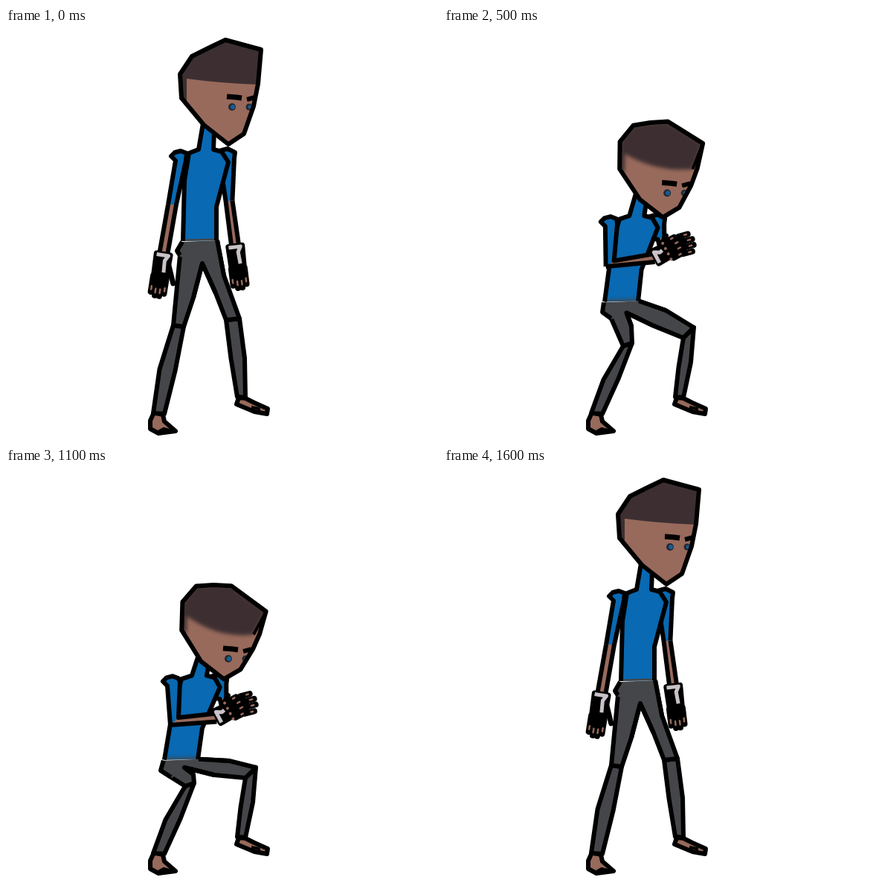
Recreate the animation shown at these times as an HTML page with a canvas. Size 581 by 553 pixels, loop 1700 ms.

```html
<!DOCTYPE html>
<html lang="en">
<head>
<meta charset="utf-8">
<title>Crouch and rise</title>
<style>
html, body { margin: 0; width: 100%; height: 100%; overflow: hidden; background: #fff; }
canvas { display: block; }
</style>
</head>
<body>
<canvas id="stage" width="581" height="553"></canvas>
<script>
const ctx = document.getElementById('stage').getContext('2d');
const INK = '#000', SKIN = '#986a5c', HAIR = '#3d2f31', SHIRT = '#0969b2', PANTS = '#454649', CUFF = '#c9c2c8';
const LOOP = 1700, STEP = 100;

// Depth of the crouch over time: 0 upright, 1 lowest
const keys = [[0, 0], [300, 0.275], [500, 0.77], [700, 0.935], [1100, 1], [1400, 0.37], [1600, 0]];

const clamp = u => Math.max(0, Math.min(1, u));
const smooth = u => (u = clamp(u)) * u * (3 - 2 * u);
const mix = (a, b, u) => a.map((v, i) => v + (b[i] - v) * u);
const add = (a, b, k = 1) => a.map((v, i) => v + b[i] * k);

// Monotone cubic through the keys
function crouchAt(t) {
  let i = 0;
  while (i < keys.length - 2 && t >= keys[i + 1][0]) i++;
  const rate = k => keys[k] && keys[k + 1] ? (keys[k + 1][1] - keys[k][1]) / (keys[k + 1][0] - keys[k][0]) : 0;
  const slope = (a, b) => a * b > 0 ? 2 * a * b / (a + b) : 0;
  const [t0, p] = keys[i], [t1, q] = keys[i + 1];
  const span = t1 - t0, u = clamp((t - t0) / span), r = rate(i);
  return p + (q - p) * smooth(u) + span * u * (1 - u) * (slope(rate(i - 1), r) * (1 - u) - slope(r, rate(i + 1)) * u);
}

let c, reach, clasp;   // crouch depth and the two stages of the arms

function setPose(t) {
  c = crouchAt(t);
  reach = smooth(c / 0.28);
  clasp = smooth((c - 0.38) / 0.36);
}
const sway = () => -15 * c * (1 - c);

// Upper body: sinks and leans forward
const sink = ([x, y]) => [
  x + sway() - c * (10 + 0.13 * (y - 170)),
  y + c * (115 - 0.08 * (y - 170))
];
// Head: tips forward; points on the front of the face travel further
const nod = ([x, y], front = 0) => {
  const dx = x - 290, dy = y - 85;
  return [
    x + c * (8 - 0.1 * (y - 16) - 4 * front),
    y + c * (134 + 0.22 * dx - 0.08 * dy - 0.0045 * dx * dy + 16 * front)
  ];
};
// Arm joints ride with the body and move in two stages
const swing = (p, out, shut) => add(add(add(p, out, reach), shut, clasp), [0, 115], c);
const leg = (up, down) => mix(up, down, c);
const knee = (up, down) => mix(up, down, 1 - (1 - c) ** 4);

function trace(pts, close) {
  ctx.beginPath();
  pts.forEach(p => ctx.lineTo(...p));
  if (close) ctx.closePath();
}
function fill(pts, color) {
  trace(pts, true);
  ctx.fillStyle = color;
  ctx.fill();
}
function line(pts, width = 6, color = INK, close = false) {
  trace(pts, close);
  ctx.lineWidth = width;
  ctx.strokeStyle = color;
  ctx.stroke();
}
function shape(pts, color) {
  fill(pts, color);
  line(pts, 6, INK, true);
}
function dot([x, y], r, color) {
  ctx.beginPath();
  ctx.arc(x, y, r, 0, Math.PI * 2);
  ctx.fillStyle = color;
  ctx.fill();
}
function soften() {
  if (c > 0.02) ctx.filter = `blur(${Math.min(2.5, c * 9)}px)`;
}

function drawFeet() {
  shape([[199, 516], [211, 519], [213, 528], [228, 541], [205, 544], [194, 538], [194, 527]], SKIN);
  line([[203, 543], [212, 538], [228, 542]], 4);
  shape([[313, 496], [322, 497], [334, 503], [352, 511], [351, 518], [334, 515], [310, 505]], SKIN);
  line([[330, 509], [340, 511], [340, 516], [351, 517]], 4);
}

function drawShin(out, inn, ankleOut, ankleIn, bulge) {
  const calf = add(mix(out, ankleOut, 0.5), [bulge, 0]);
  const front = add(mix(inn, ankleIn, 0.5), [-bulge / 3, 0]);
  shape([out, calf, ankleOut, ankleIn, front, inn], PANTS);
}

function drawLegs() {
  const crotch = leg([264, 316], [240, 402]);
  const hipL = sink([237, 287]), hipR = sink([284, 285]);
  const corner = leg([230, 299], [208, 406]), fold = leg([234, 305], [222, 415]);

  const farKnee = knee([305, 391], [329, 409]), farHalf = knee([9, -1], [7, -7]);
  const farOut = add(farKnee, farHalf), farIn = add(farKnee, farHalf, -1);
  drawShin(farOut, farIn, [322, 496], [311, 495], 3);
  const farThigh = [hipR, leg([293, 332], [300, 393]), farOut, farIn, leg([282, 356], [280, 412]), crotch];
  fill(farThigh, PANTS);
  line(farThigh);

  const nearKnee = knee([232, 400], [247, 425]), nearHalf = knee([-7, -1], [-6, 2]);
  const nearOut = add(nearKnee, nearHalf), nearIn = add(nearKnee, nearHalf, -1);
  drawShin(nearOut, nearIn, [198, 517], [213, 518], -5);
  const nearThigh = [corner, fold, nearOut, nearIn, leg([252, 362], [252, 411]), crotch];
  fill(nearThigh, PANTS);
  line(nearThigh);

  const pelvis = [hipL, corner, fold, crotch, farThigh[1], hipR];
  fill(pelvis, PANTS);
  line([fold, crotch, hipR], 3, PANTS);
  line([hipL, corner, fold]);
  line([hipR, farThigh[1]]);
  line([nearThigh[4], crotch, farThigh[4]]);
}

function drawTorso() {
  const left = [[265, 128], [259, 163], [246, 168], [240, 205], [238, 286]].map(sink);
  const right = [[283, 285], [283, 240], [299, 180], [290, 166], [279, 163], [280, 138]].map(sink);
  const body = [...left, ...right];
  fill(body, SHIRT);
  ctx.save();
  trace(body, true);
  ctx.clip();
  soften();
  line([left[4], right[0]], 5, PANTS);
  ctx.restore();
  line(left);
  line(right);
}

function drawHead() {
  const skull = [[295, 16], [343, 29], [339, 75], [333, 105], [320, 142], [299, 156],
    [266, 130], [236, 94], [234, 62], [250, 38], [272, 27]].map(p => nod(p));
  fill(skull, SKIN);
  ctx.save();
  trace(skull, true);
  ctx.clip();

  const [x, y] = nod([304, 106], 1);
  for (const [dx, r] of [[0, 5], [23, 4.5]]) {
    dot([x + dx, y], r, '#252831');
    dot([x + dx + 1, y], r - 2, '#155f96');
  }
  line([[x - 7, y - 14], [x + 6, y - 13], [x + 13, y - 12]], 7);
  line([[x + 20, y - 10], [x + 31, y - 13]], 6);

  // Hair with a curved lower edge and a sideburn
  const edgeR = add(nod([339, 76]), [-8, 0], c), edgeL = nod([243, 68], 0.6), bend = nod([288, 74], 1.3);
  trace([...skull.slice(7), skull[0], skull[1], edgeR]);
  ctx.quadraticCurveTo(...bend, ...edgeL);
  ctx.lineTo(...nod([243, 98]));
  ctx.fillStyle = HAIR;
  soften();
  ctx.fill();
  ctx.restore();
  line([skull[1], edgeR], 4);
  line(skull, 6, INK, true);
}

// Sleeve above the elbow, bare skin below, no seam line between
function drawArm(shoulder, elbow, wrist, cap) {
  const top = cap.map(p => add(shoulder[0], p));
  fill([...elbow, wrist[1], wrist[0]], SKIN);
  fill([elbow[0], shoulder[0], ...top, shoulder[1], elbow[1]], SHIRT);
  line([elbow[0], shoulder[0], ...top, shoulder[1], elbow[1], wrist[1]]);
  line([elbow[0], wrist[0]]);
}

// Pair of points on both sides of the end of a bone
function sides(from, to, at, half) {
  const dx = to[0] - from[0], dy = to[1] - from[1], k = half / Math.hypot(dx, dy);
  return [add(at, [-dy, dx], k), add(at, [dy, -dx], k)];
}

function drawHand([x, y], degrees, thumb) {
  const len = 64 - 4 * reach - 14 * clasp;
  ctx.save();
  ctx.translate(x, y);
  ctx.rotate(degrees * Math.PI / 180);
  ctx.lineCap = 'round';
  line([[2, -9], [len * 0.55, -8], [len * 0.55, 8], [2, 9]], 8, INK, true);
  fill([[0, -10], [len * 0.6, -10], [len * 0.6, 10], [0, 10]], INK);
  line([[12, thumb * 8], [len * 0.6, thumb * 19]], 7);
  const tips = [0, 1, 2, 3].map(i => [len - 4 - 4 * Math.abs(i - 1.5), (i - 1.5) * (6 + 2 * clasp)]);
  for (const tip of tips) {
    const root = [len * 0.5, tip[1]];
    line([root, tip], 8);
    line([mix(root, tip, 0.65), mix(root, tip, 0.85)], 2.5, SKIN);
    if (clasp > 0.5) dot(add(root, [-4, 0]), 2, SKIN);
  }
  ctx.lineCap = 'butt';
  line([[3, 9], [3, -7], [10, -3], [26 - 12 * reach, -4]], 5, CUFF);
  ctx.restore();
}

function draw(t) {
  setPose(t);
  ctx.fillStyle = '#fff';
  ctx.fillRect(0, 0, 581, 553);

  const farElbow = swing([300, 232], [4, -2], [-12, -36]);
  const farWrist = swing([308, 291], [19, -14], [-31, -68]);
  drawArm([sink([307, 175]), sink([290, 195])],
    sides(farWrist, farElbow, farElbow, 4.5), sides(farWrist, farElbow, farWrist, 5),
    [[1, -8], [-9, -13], [-20, -10]]);
  drawFeet();
  drawLegs();
  drawTorso();
  drawHead();
  drawHand(farWrist, 83 - 21 * reach - 77 * clasp, 0);

  const wrist = swing([212, 302], [29, -15], [42, -67]);
  const elbow = [leg([218, 237], [221, 345]), leg([229, 237], [232, 335])].map(p => add(p, [sway(), 0]));
  const shoulder = sink([228, 178]);
  drawArm([shoulder, add(shoulder, leg([14, 0], [17, -5]))], elbow, sides(mix(...elbow, 0.5), wrist, wrist, 5.5),
    [[-6, -6], [-1, -11], [7, -13], [15, -10]]);
  drawHand(wrist, 99 - 35 * reach - 92 * clasp, -1);
}

ctx.lineJoin = 'round';
let last = -1;
function tick() {
  const t = Math.floor(performance.now() % LOOP / STEP) * STEP;
  if (t !== last) draw(last = t);
  requestAnimationFrame(tick);
}
tick();
</script>
</body>
</html>
```
